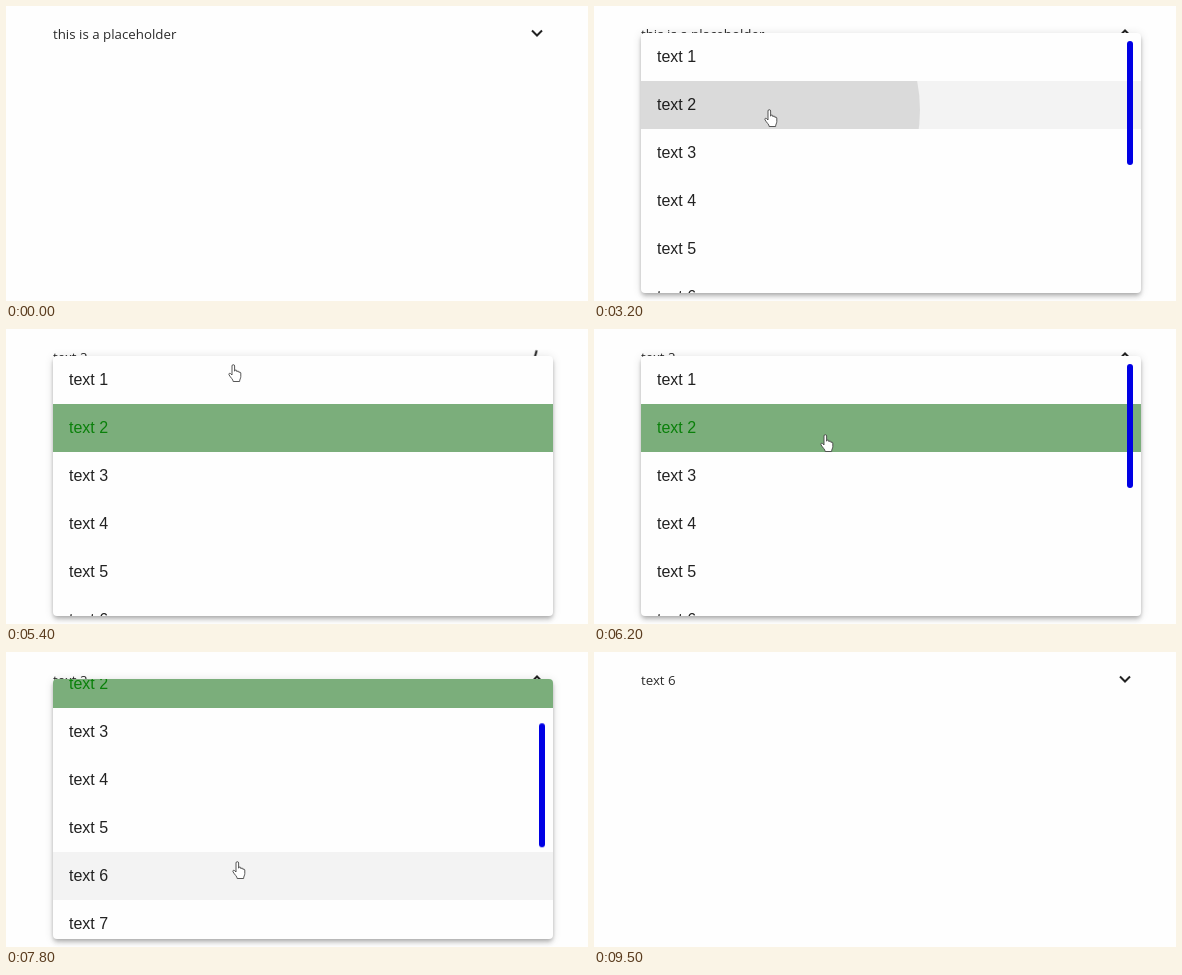
Recreate the animation shown at these times as an HTML page. Size 582 by 295 pixels, loop 10 s.

```html
<!DOCTYPE html>
<html lang="en">
<head>
<meta charset="utf-8">
<title>Select box</title>
<style>
@property --scroll { syntax: "<number>"; inherits: true; initial-value: 0; }

html, body { margin: 0; width: 100%; height: 100%; overflow: hidden; background: #fefefe; }
#stage { position: relative; width: 582px; height: 295px; overflow: hidden; }
#stage * { position: absolute; }

/* One percent of the loop is 100 ms, and every value holds until the next key. */
.a { animation: 10s step-end infinite; }

.label { left: 47px; top: 18px; font: 13.3px/20px "Open Sans", "Noto Sans", sans-serif; color: #2b2b2b; white-space: nowrap; }
.first { animation-name: first; }
.second { opacity: 0; animation-name: second; }
.third { opacity: 0; animation-name: third; }
@keyframes first { 33% { opacity: 0; } }
@keyframes second { 33% { opacity: 1; } 82% { opacity: 0; } }
@keyframes third { 82% { opacity: 1; } }

svg { overflow: visible; }
.chevron { left: 531px; top: 27px; width: 1px; height: 1px; transform-origin: 0 0; animation-name: chevron; }
@keyframes chevron {
  11% { transform: rotate(10deg); } 12% { transform: rotate(60deg); }
  13% { transform: rotate(135deg); } 14% { transform: rotate(180deg); }
  33% { transform: rotate(160deg); } 34% { transform: rotate(80deg); }
  35% { transform: rotate(15deg); } 36% { transform: none; }
  53% { transform: rotate(10deg); } 54% { transform: rotate(60deg); }
  55% { transform: rotate(135deg); } 56% { transform: rotate(180deg); }
  82% { transform: rotate(160deg); } 83% { transform: rotate(80deg); }
  84% { transform: rotate(15deg); } 85% { transform: none; }
}

.panel {
  left: 47px; top: 27px; width: 500px; height: 260px; overflow: hidden;
  border-radius: 4px; background: #fefefe; opacity: 0; transform-origin: top;
  box-shadow: 0 2px 4px -1px rgba(0,0,0,.2), 0 4px 5px rgba(0,0,0,.14), 0 1px 10px rgba(0,0,0,.12);
  animation-name: panel, scroll;
}
@keyframes panel {
  11%, 53% { opacity: .35; transform: scaleY(.88); }
  12%, 54% { opacity: 1; transform: none; }
  33%, 82% { opacity: .5; }
  34%, 83% { opacity: 0; }
}
@keyframes scroll {
  70% { --scroll: 4; } 71% { --scroll: 17; } 72% { --scroll: 42; }
  73% { --scroll: 58; } 74% { --scroll: 65; } 75% { --scroll: 67; }
  84% { --scroll: 0; }
}

.list { left: 0; top: 0; width: 500px; transform: translateY(calc(var(--scroll) * -1px)); }
.row, .hover, .chosen { left: 0; width: 500px; height: 48px; }
.row {
  top: calc(var(--i) * 48px); overflow: hidden; box-sizing: border-box; padding-left: 16px;
  font: 16px/48px "Liberation Sans", Arial, sans-serif; color: #222;
}
.pick2 { animation-name: pick2; }
.pick6 { animation-name: pick6; }
@keyframes pick2 { 33% { color: #0a800a; } 82% { color: #222; } }
@keyframes pick6 { 82% { color: #0a800a; } }

.hover { top: 0; background: #f3f3f3; opacity: 0; animation-name: hover; }
@keyframes hover {
  13% { opacity: 1; top: 0; }
  26% { top: 48px; }
  34% { opacity: 0; }
  55% { opacity: 1; top: 0; }
  62% { top: 48px; }
  63% { top: 96px; }
  64% { top: 144px; }
  74% { top: 240px; }
  83% { opacity: 0; }
}
.chosen { top: 48px; background: #7bae7b; opacity: 0; animation-name: chosen; }
@keyframes chosen { 33% { opacity: 1; top: 48px; } 82% { top: 240px; } }

.ripple { width: 302px; height: 302px; margin: -151px; border-radius: 50%; background: rgba(0,0,0,.1); opacity: 0; }
.pick2 .ripple { left: 128px; top: 29px; animation-name: ripple2; }
.pick6 .ripple { left: 183px; top: 10px; animation-name: ripple6; }
@keyframes ripple2 { 32% { opacity: 1; } 33% { opacity: .8; transform: scale(2.2); } 34% { opacity: 0; } }
@keyframes ripple6 { 81% { opacity: 1; } 82% { opacity: .8; transform: scale(2.2); } 83% { opacity: 0; } }

.thumb {
  left: 486px; top: 8px; width: 6px; height: 124px; border-radius: 3px; background: #0000e4;
  opacity: 0; transform: translateY(calc(var(--scroll) * .5417px)); animation-name: thumb;
}
@keyframes thumb {
  13%, 55% { opacity: .07; } 14%, 56% { opacity: .45; }
  15%, 57% { opacity: .8; } 16%, 58% { opacity: 1; }
  34%, 83% { opacity: 0; }
}

.cursor { left: 0; top: 0; width: 14px; height: 19px; opacity: 0; animation-name: cursor; }
@keyframes cursor {
  5% { opacity: 1; transform: translate(186px, 115px); } 6% { transform: translate(190px, 78px); }
  7% { transform: translate(192px, 46px); } 8% { transform: translate(192px, 35px); }
  25% { transform: translate(188px, 50px); } 26% { transform: translate(180px, 78px); }
  27% { transform: translate(173px, 97px); } 28% { transform: translate(170px, 103px); }
  48% { transform: translate(178px, 92px); } 49% { transform: translate(198px, 65px); }
  50% { transform: translate(215px, 42px); } 51% { transform: translate(222px, 35px); }
  61% { transform: translate(223px, 55px); } 62% { transform: translate(226px, 105px); }
  63% { transform: translate(229px, 154px); } 64% { transform: translate(229px, 190px); }
  65% { transform: translate(228px, 201px); }
  77% { transform: translate(227px, 206px); } 78% { transform: translate(226px, 209px); }
  88% { transform: translate(226px, 214px); } 89% { transform: translate(226px, 222px); }
  90% { transform: translate(227px, 232px); } 91% { transform: translate(227px, 244px); }
  92% { transform: translate(228px, 258px); } 93% { transform: translate(229px, 272px); }
  94% { transform: translate(230px, 286px); } 95% { opacity: 0; }
}
.hand { opacity: 0; animation-name: hand; }
.arrow { animation-name: arrow; }
@keyframes hand { 8%, 50% { opacity: 1; } 34%, 83% { opacity: 0; } }
@keyframes arrow { 8%, 50% { opacity: 0; } 34%, 83% { opacity: 1; } }
</style>
</head>
<body>
<div id="stage">
  <div class="a label first">this is a placeholder</div>
  <div class="a label second">text 2</div>
  <div class="a label third">text 6</div>
  <svg class="a chevron"><path d="M-5-2.5 0 2.5 5-2.5" fill="none" stroke="#222" stroke-width="2"/></svg>

  <div class="a panel">
    <div class="list">
      <div class="a hover"></div>
      <div class="a chosen"></div>
      <div class="row" style="--i:0">text 1</div>
      <div class="a row pick2" style="--i:1"><i class="a ripple"></i>text 2</div>
      <div class="row" style="--i:2">text 3</div>
      <div class="row" style="--i:3">text 4</div>
      <div class="row" style="--i:4">text 5</div>
      <div class="a row pick6" style="--i:5"><i class="a ripple"></i>text 6</div>
      <div class="row" style="--i:6">text 7</div>
    </div>
    <div class="a thumb"></div>
  </div>

  <svg class="a cursor" viewBox="0 0 14 19" fill="#fff" stroke="#444" stroke-width=".9" stroke-linejoin="round">
    <path class="a hand" d="M4 11V2a1.3 1.3 0 0 1 2.6 0v5.2a1.1 1.1 0 0 1 2.3 0v.6a1.1 1.1 0 0 1 2.1.2v.6a1 1 0 0 1 1.8.4v3.5c0 2-1.2 2.8-1.2 5H5.2c0-2-2.6-3.8-4.2-6.7-.6-1.3.8-2 1.6-1.2z"/>
    <path class="a arrow" d="M4.5.5v15.2l3.4-3.2 2.2 5 2-.9-2.2-4.9h4.5z"/>
  </svg>
</div>
</body>
</html>
```
